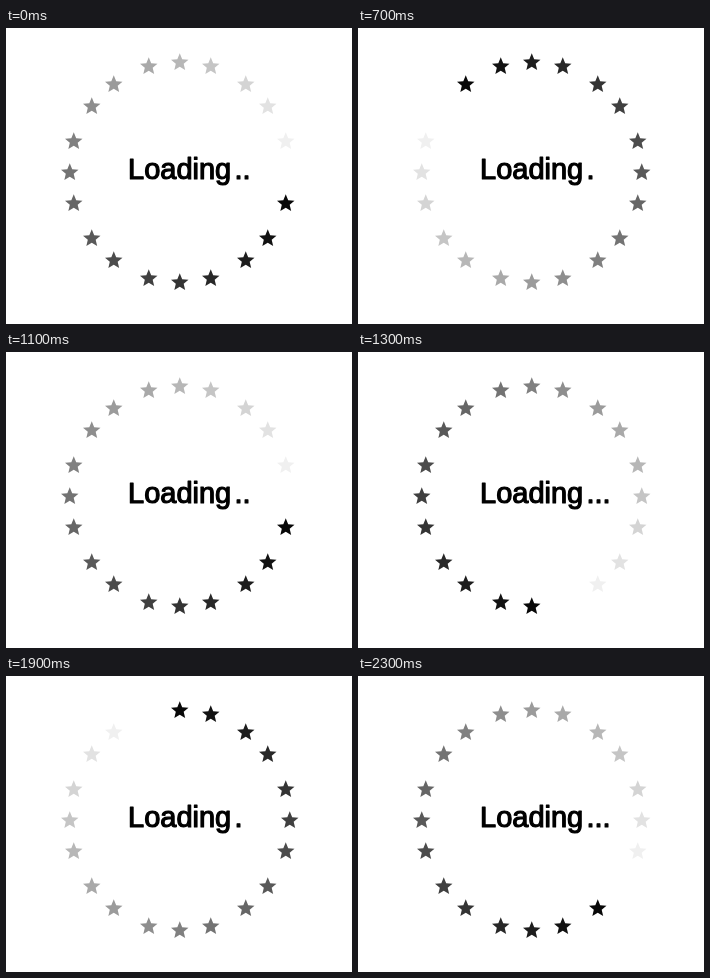
Recreate the animation shown at these times as an HTML page with a canvas. Size 346 by 296 pixels, loop 2.4 s.

```html
<!DOCTYPE html>
<html lang="en">
<head>
<meta charset="utf-8">
<title>Loading</title>
<style>
  html, body { margin: 0; width: 100%; height: 100%; overflow: hidden; background: #fff; }
  canvas { display: block; }
</style>
</head>
<body>
<canvas id="stage" width="346" height="296"></canvas>
<script>
const ctx = document.getElementById('stage').getContext('2d');
const W = 346, H = 296, LOOP = 2400, STEP = 100, COUNT = 20;
const CX = 173.75, CY = 144.5, STAR_R = 9.2, INNER = 0.45;

// One quarter of the ring; the other quarters are rotations of it.
const QUARTER = [[0, -110], [31, -106], [66, -88], [88, -66], [106, -31]];
const ring = [];
for (let q = 0; q < 4; q++) {
  for (const p of QUARTER) {
    let [x, y] = p;
    for (let k = 0; k < q; k++) [x, y] = [-y, x];
    ring.push([CX + x, CY + y]);
  }
}

// The ring turns two stars per step, with a single in-between step per turn.
function gapAt(beat) {
  const moved = beat < 5 ? beat * 2 : beat * 2 - (beat === 5 ? 1 : 2);
  return (5 + moved) % COUNT;
}

function dotsAt(beat) {
  if (beat >= 1 && beat <= 5) return 3;
  return beat >= 6 && beat <= 8 ? 1 : 2;
}

function star(x, y, gray) {
  ctx.beginPath();
  for (let i = 0; i < 10; i++) {
    const r = i % 2 ? STAR_R * INNER : STAR_R;
    const a = i * Math.PI / 5;
    ctx.lineTo(x + r * Math.sin(a), y - r * Math.cos(a));
  }
  ctx.closePath();
  ctx.fillStyle = `rgb(${gray},${gray},${gray})`;
  ctx.fill();
}

function label(text, x) {
  ctx.fillText(text, x, 151);
  ctx.strokeText(text, x, 151);
}

function draw(ms) {
  const beat = Math.floor((ms % LOOP) / STEP) % 11;
  ctx.fillStyle = '#fff';
  ctx.fillRect(0, 0, W, H);

  const gap = gapAt(beat);
  ring.forEach(([x, y], i) => {
    const behind = (i - gap + COUNT) % COUNT;
    if (behind) star(x, y, Math.round(255 * Math.pow(behind / COUNT, 1.15)));
  });

  ctx.font = '29px "Liberation Sans", Arial, sans-serif';
  ctx.fillStyle = ctx.strokeStyle = '#000';
  ctx.lineWidth = 1.2;
  ctx.lineJoin = 'round';
  label('Loading', 122);
  label('.'.repeat(dotsAt(beat)), 228.5);
}

const start = performance.now();
function tick() {
  draw(performance.now() - start);
  requestAnimationFrame(tick);
}
tick();
</script>
</body>
</html>
```
